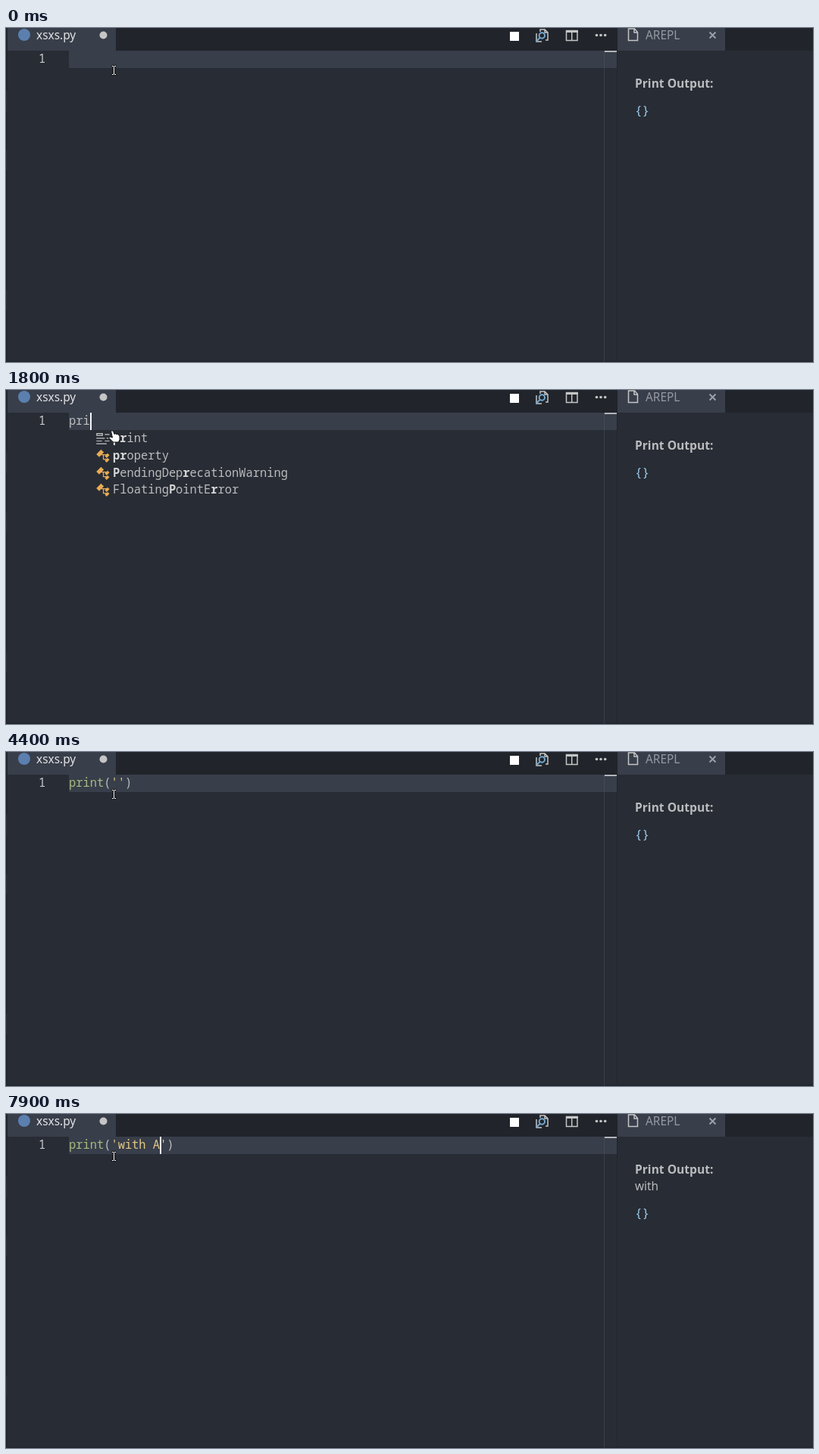
An HTML page for the animation above (8000 ms loop, 1065x442 px).

```html
<!DOCTYPE html>
<html lang="en">
<head>
<meta charset="utf-8">
<title>Live Python output</title>
<style>
html, body { margin: 0; width: 100%; height: 100%; overflow: hidden; background: #282c34; }
svg { display: block; }
text { font: 15.4px "Noto Sans", "Open Sans", sans-serif; fill: #bbbcbe; white-space: pre; }
.mono, .mono text { font-family: "Noto Sans Mono", "DejaVu Sans Mono", monospace; }
.b { font-weight: bold; fill: #d6d6d6; }
.fn { fill: #a8ba7e; }
.str { fill: #e4c984; }
.line { fill: none; stroke: #c5c5c5; stroke-width: 1.5; }
</style>
</head>
<body>
<svg width="1065" height="442" viewBox="0 0 1065 442">
  <defs>
    <path id="keyword" fill="#c5c5c5" d="M15 4h-5V3h5zM14 7h-2v1h2zM10 7H1v1h9zM12 13H1v1h11zM7 10H1v1h6zM15 10h-5v1h5zM8 2v3H1V2zM7 3H2v1h5z"/>
    <path id="method" fill="none" stroke="#b180d7" d="M8.100 1.300l5.600 2.900v6.900l-5 3.500-6.200-3.900V4.100zM2.500 4.100l6 3.300 5.200-3.200M8.500 7.400v7.200"/>
    <path id="class" fill="#e8ab53" d="M13 10l2 2-3 3-2-2 1-1H8V7H6L4 9 1 6l5-5 3 3-2 2h5l1-1 2 2-3 3-2-2 1-1H9v4h3z"/>
    <g id="module" fill="none" stroke="#c5c5c5">
      <path d="M2 12V1.500h12V12"/>
      <path d="M1.500 13.500h13" stroke-dasharray="1 1"/>
    </g>
    <path id="variable" fill="#e8ab53" fill-rule="evenodd" d="M14 2H8L7 3v3h1V3h6v5h-4v1h4l1-1V3zM9 6h4v1H9zM2 7L1 8v5l1 1h6l1-1V8L8 7zM8 13H2V8h6zM3 9h4v1H3zM3 11h4v1H3zM9 4h4v1H9z"/>
  </defs>

  <rect width="1065" height="442" fill="#282c34"/>
  <rect width="1065" height="30" fill="#21252b"/>
  <path fill="#21252b" d="M0 0h2v83H0zM0 110h1.500v52H0zM0 188h1.500v159H0zM0 374h1.500v68H0zM0 440.500h1065v1.500H0zM806 30h1v412h-1z"/>
  <path fill="#383e4a" d="M2 0h143v30H2zM807 0h142v30H807zM83 30h723v23H83zM789 53h1v389h-1z"/>
  <path fill="#454a54" d="M789 30h1v23h-1z"/>
  <rect x="790" y="30" width="16" height="2" fill="#b4b6ba"/>

  <circle cx="24" cy="9" r="8" fill="#5b7fae"/>
  <text x="40" y="15" style="fill:#e2e3e5">xsxs.py</text>
  <circle cx="128.500" cy="9.500" r="5" fill="#c5c5c5"/>

  <rect x="665" y="5" width="12" height="12" fill="#fff"/>
  <path class="line" d="M705 5V2h6l4 4v10h-3M711 2v4h4M700 7v11h7"/>
  <path class="line" style="stroke:#75a9d0;stroke-width:2" d="M711 10a3.700 3.700 0 1 0-7.400 0a3.700 3.700 0 1 0 7.400 0M704.500 13l-5 5"/>
  <path class="line" d="M739.500 3.500h14.500v13h-14.500zM746.700 4v12"/>
  <path d="M739 3h16v3h-16z" fill="#c5c5c5"/>
  <g fill="#c5c5c5"><circle cx="779.500" cy="9.500" r="1.800"/><circle cx="785" cy="9.500" r="1.800"/><circle cx="790.700" cy="9.500" r="1.800"/></g>

  <path class="line" d="M821.500 1h8l4 4.500v11h-12zM829 1v5h4.500"/>
  <text x="844" y="15" style="fill:#9599a2">AREPL</text>
  <path class="line" style="stroke:#9ca0a8;stroke-width:2" d="M928.500 5.500l8 8m0-8l-8 8"/>

  <text x="830" y="79" style="font-weight:bold;font-size:15.6px">Print Output:</text>
  <text id="output" x="830" y="101">with</text>
  <text id="vars" class="mono" x="830" style="fill:#9ccbea;font-size:16px">{}</text>

  <text class="mono" x="43" y="46" style="fill:#c8cacd">1</text>
  <g id="brackets">
    <path fill="none" stroke="#888d96" d="M129.500 30.500h9v22h-9zM139.500 30.500h8v22h-8z"/>
    <rect x="795" y="30" width="6" height="3" fill="#a0a0a0"/>
  </g>
  <text id="code" class="mono" x="83" y="46"></text>
  <rect id="caret" y="30" width="2" height="23" fill="#f4f4f4"/>
  <g id="popup" class="mono"></g>

  <g id="beam" fill="none">
    <path stroke="#15171b" stroke-width="3" d="M139.500 50.500h6M139.500 61.500h6M142.500 50v12"/>
    <path stroke="#fff" d="M140 50.500h2m1 0h2M140 61.500h2m1 0h2M142.500 51v10"/>
  </g>
  <path id="hand" fill="#fff" stroke="#111" d="M138.500 54.500q1.500-1.500 3 0l1.500 4 1.500-.8 1.500 1 1.500-.3 1.200 1.400 1.300.7v5l-1.500 3.500h-7l-5.500-5.500q0-2 2-1.500l2.500 1z"/>
</svg>

<script>
const $ = id => document.getElementById(id);
const LEFT = 83, CHAR = 9.24, ROW = 22.8, LOOP = 8000;

// Each entry is "icon label"; asterisks enclose the matched letters.
const all = ["keyword *p*ass", "method *p*ow", "keyword *p*rint", "class *p*roperty",
  "module *p*db", "module *p*udb", "class *P*endingDeprecationWarning",
  "variable __*p*ackage__", "class Floating*P*ointError", "module from_trans_import_*p*gettext"];
const some = ["keyword *pr*int", "class *pr*operty",
  "class *P*endingDep*r*ecationWarning", "class Floating*P*ointE*r*ror"];
const few = ["keyword *pri*nt", "class *P*endingDep*r*ecat*i*onWarning"];
const one = ["keyword *print*"];

// Start time, text with "|" at the insertion point, caret visible, suggestions
const steps = [
  [0, "|", 0], [500, "|", 1], [1000, "|", 0], [1500, "|", 1],
  [1600, "p|", 1, all], [1700, "pr|", 1, some], [1800, "pri|", 1, some],
  [1900, "prin|", 1, few], [2100, "print|", 1, one], [2600, "print|", 0, one],
  [2900, "print(|)", 1], [3300, "print(|)", 0], [3800, "print(|)", 1],
  [3900, "print('|')", 1], [4400, "print('|')", 0], [4900, "print('|')", 1],
  [5100, "print('w|')", 1], [5200, "print('wi|')", 1], [5400, "print('wit|')", 1],
  [5600, "print('with|')", 1], [5800, "print('with |')", 1],
  [6300, "print('with |')", 0], [6800, "print('with |')", 1],
  [7300, "print('with |')", 0], [7800, "print('with |')", 1],
  [7900, "print('with A|')", 1]
];

const show = (id, on) => $(id).style.display = on ? "" : "none";
const span = (cls, s) => `<tspan class="${cls}">${s}</tspan>`;
const highlight = s => s.replace(/'.*'|print/g, m => span(m[0] === "'" ? "str" : "fn", m));

function row(item, i, x) {
  const [icon, label] = item.split(" ");
  const y = Math.floor(53.4 + i * ROW);
  return `<use href="#${icon}" transform="translate(${x} ${y + 1.5}) scale(1.2375)"/>` +
    `<text x="${x + 23}" y="${y + 16}">${label.replace(/\*(.+?)\*/g, (_, m) => span("b", m))}</text>`;
}

let last;
function draw(t) {
  const step = steps.findLast(s => s[0] <= t);
  if (step !== last) {
    const [, text, caret, list = []] = last = step;
    const x = LEFT + text.indexOf("|") * CHAR;
    $("code").innerHTML = highlight(text.replace("|", ""));
    $("caret").setAttribute("x", Math.round(x));
    $("popup").innerHTML = list.map((item, i) => row(item, i, Math.round(x + 7))).join("");
    show("caret", caret);
    show("hand", list.length);
    show("beam", !list.length);
  }
  show("brackets", t >= 3000 && t < 3900);
  show("output", t >= 6100);
  $("vars").setAttribute("y", t >= 6100 ? 137 : 115);
}

const start = performance.now();
function tick() {
  draw((performance.now() - start) % LOOP);
  requestAnimationFrame(tick);
}
tick();
</script>
</body>
</html>
```
